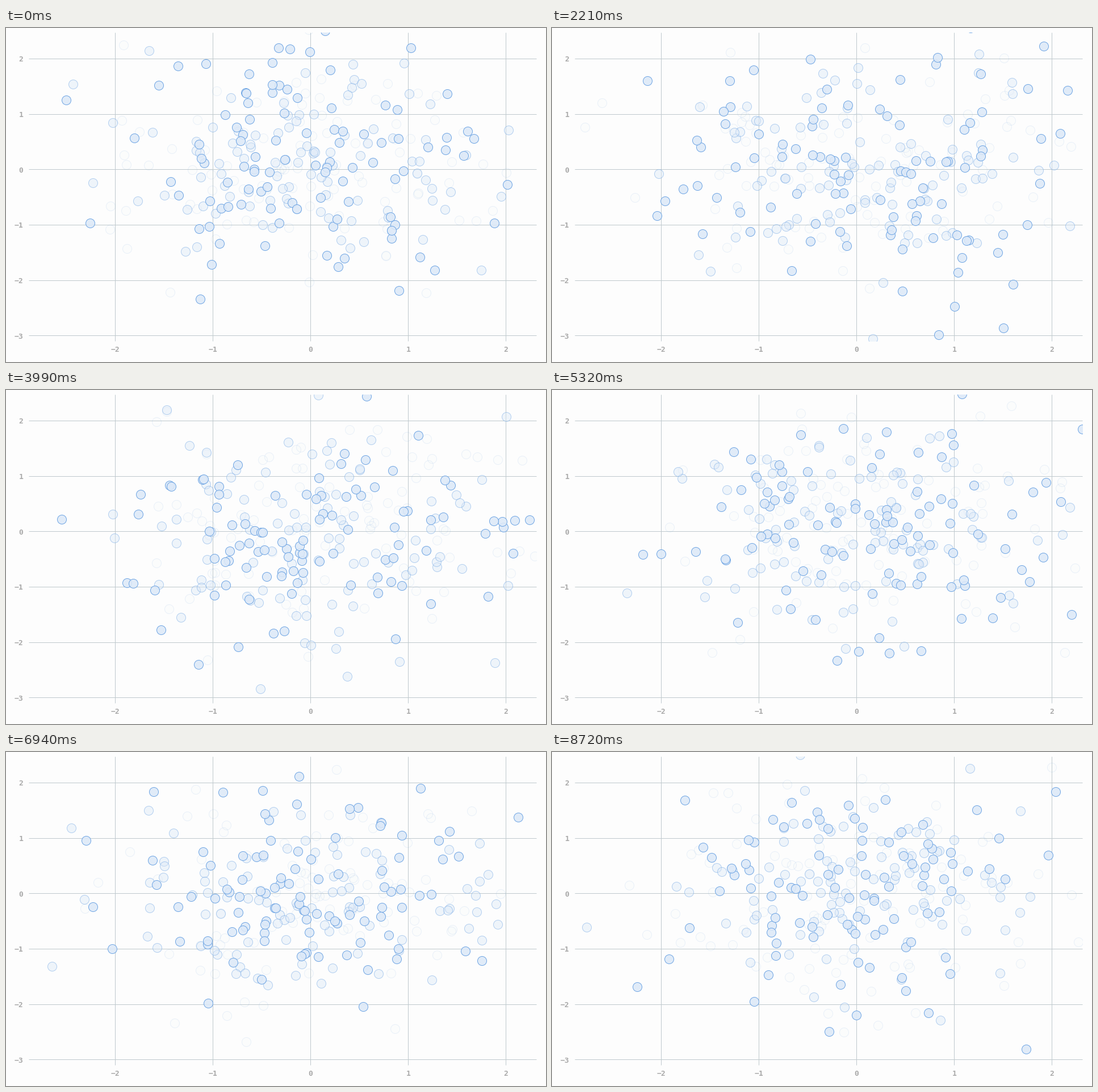
A matplotlib script that plays this animation: 951 px wide and 589 px high, repeating every 8.82 s.

```python
import math

import numpy as np
import matplotlib.pyplot as plt
from matplotlib.animation import FuncAnimation
from matplotlib.colors import to_rgba
from matplotlib.patches import Rectangle

W, H, DPI = 951, 589, 64
PT = 72 / DPI                                  # points per pixel
LEFT, TOP, RIGHT, BOTTOM = 40, 8, 934, 552     # plot area
ORIGIN = np.array([536.5, 249.9])
UNIT = np.array([172, -97.65])
FRAMES, LOOP = 60, 8820
COUNT, SEED = 100, 40
GRID, LABEL = "#bfc9cd", "#a9a9a9"
FILL, EDGE = "#dde9f8", "#70a6e4"
# Fill and edge opacity, newest sample first
AGES = ((0.88, 1), (0.44, 0.5), (0.04, 0.13))


def sample(k):
    """Pixel positions of the k-th standard normal sample."""
    rng = np.random.default_rng(SEED + k)
    return ORIGIN + UNIT * rng.standard_normal((COUNT, 2))


def grid_line(xs, ys):
    # Whole coordinates snap to the centre of that pixel.
    ax.plot(xs, ys, color=GRID, lw=PT, zorder=1, solid_capstyle="butt")


def label(x, y, value, align):
    ax.text(x, y + 4.7, f"{value}".replace("-", "\u2212"), ha=align,
            va="baseline", color=LABEL, family="DejaVu Sans Mono",
            weight="bold", size=13 * PT)


fig = plt.figure(figsize=(W / DPI, H / DPI), dpi=DPI, facecolor="#fdfdfd")
ax = fig.add_axes([0, 0, 1, 1])
ax.set(xlim=(0, W), ylim=(H, 0))
ax.axis("off")

for v in range(-2, 3):
    x = ORIGIN[0] + v * UNIT[0]
    grid_line([math.floor(x)] * 2, [TOP, BOTTOM])
    label(x, 566.3, v, "center")
for v in range(-3, 3):
    y = ORIGIN[1] + v * UNIT[1]
    grid_line([LEFT, RIGHT], [math.floor(y)] * 2)
    label(30.5, y, v, "right")

window = Rectangle((LEFT, TOP), RIGHT - LEFT, BOTTOM - TOP,
                   transform=ax.transData)
layers = []
for age, (fill, edge) in enumerate(AGES):
    dots = ax.scatter([], [], s=(16 * PT) ** 2, lw=PT, zorder=5 - age,
                      facecolors=[to_rgba(FILL, fill)],
                      edgecolors=[to_rgba(EDGE, edge)])
    dots.set_clip_path(window)
    layers.append(dots)


def update(i):
    for age, dots in enumerate(layers):
        dots.set_offsets(sample(i - age))
    return layers


anim = FuncAnimation(fig, update, frames=FRAMES, interval=LOOP / FRAMES,
                     repeat=True, repeat_delay=0, blit=False)
plt.show()
```
